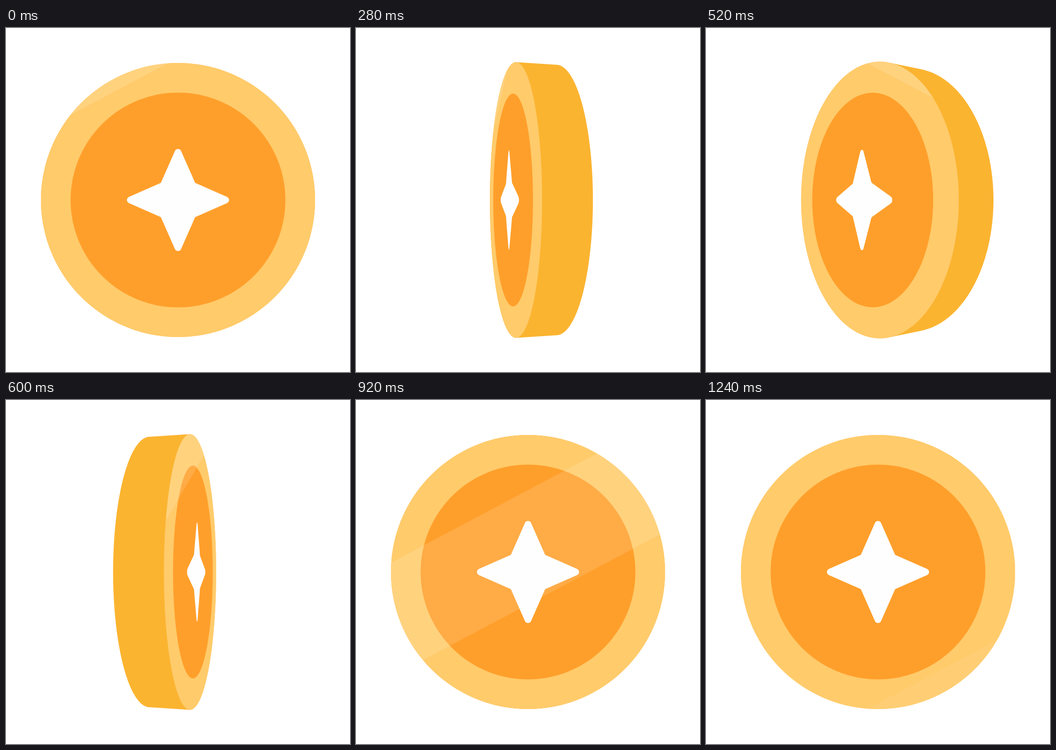
An HTML page with a canvas that plays this animation: 748 by 748 pixels, repeating every 1280 ms.

```html
<!DOCTYPE html>
<html>
<head>
<meta charset="utf-8">
<style>
  html, body { margin: 0; width: 100%; height: 100%; overflow: hidden; background: #fff; }
  canvas { display: block; width: 748px; height: 748px; }
</style>
</head>
<body>
<canvas id="stage" width="748" height="748"></canvas>
<script>
const ctx = document.getElementById('stage').getContext('2d');
const LOOP = 1280, STEP = 40, SPIN = 880;
const CENTER = 374, RADIUS = 298, INNER = 233.5;
const HALF = 44, CAMERA = 1080;          // half thickness, viewing distance
const SLOPE = 0.53, BAND = 248.5;        // glint tilt and height

const arc = (cx, cy, r, from, to, n) => Array.from({ length: n + 1 }, (_, i) => {
  const a = from + (to - from) * i / n;
  return [cx + r * Math.cos(a), cy + r * Math.sin(a)];
});
const circle = r => arc(0, 0, r, 0, 2 * Math.PI, 180);
const rim = circle(RADIUS), inner = circle(INNER);

// One rounded tip and one notch, turned four times
const arm = [...arc(0, -103.7, 7.3, -2.73, -0.41, 12), [37.3, -37.3]];
const star = [0, 1, 2, 3].flatMap(k => arm.map(([x, y]) =>
  [[x, y], [-y, x], [-x, -y], [y, -x]][k]));

// Cubic bezier ease (0.41, 0, 0.59, 1)
function easeInOut(x) {
  let lo = 0, hi = 1;
  for (let i = 0; i < 30; i++) {
    const s = (lo + hi) / 2, r = 1 - s;
    if (1.23 * r * r * s + 1.77 * r * s * s + s * s * s < x) lo = s; else hi = s;
  }
  return lo * lo * (3 - 2 * lo);
}

// Height of the glint's lower edge on the coin's vertical axis
function glintAt(t) {
  const late = Math.max(0, t - 920);
  return -309 + 0.958 * Math.max(0, t - 524) + 4.8e-6 * late ** 3;
}

function projector(angle, depth) {
  const c = Math.cos(angle), s = Math.sin(angle);
  return ([x, y]) => {
    const scale = (CAMERA - HALF) / (CAMERA - x * s - depth * c);
    return [CENTER + (x * c - depth * s) * scale, CENTER + y * scale];
  };
}

function hull(points) {
  const half = list => {
    const out = [];
    for (const p of list) {
      while (out.length > 1) {
        const [a, b] = out.slice(-2);
        if ((b[0] - a[0]) * (p[1] - a[1]) > (b[1] - a[1]) * (p[0] - a[0])) break;
        out.pop();
      }
      out.push(p);
    }
    return out;
  };
  const sorted = points.sort((a, b) => a[0] - b[0] || a[1] - b[1]);
  return [...half(sorted), ...half(sorted.slice().reverse())];
}

function trace(points) {
  ctx.beginPath();
  points.forEach(([x, y]) => ctx.lineTo(x, y));
  ctx.closePath();
}

function fill(points, color) {
  trace(points);
  ctx.fillStyle = color;
  ctx.fill();
}

function draw(t) {
  const turn = 2 * Math.PI * easeInOut(Math.min(1, t / SPIN));
  const flipped = Math.cos(turn) < 0;
  const angle = flipped ? turn - Math.PI : turn;
  const front = projector(angle, HALF), back = projector(angle, -HALF);

  ctx.fillStyle = '#fff';
  ctx.fillRect(0, 0, 748, 748);
  fill(hull([...rim.map(front), ...rim.map(back)]), '#fbb430');
  if (CAMERA * Math.cos(angle) <= HALF) return;

  fill(rim.map(front), '#ffcb6b');
  fill(inner.map(front), '#ff9f2b');

  const low = glintAt(t), lean = flipped ? -SLOPE : SLOPE, w = 400;
  const fade = Math.min(1, (1300 - t) / 120);
  ctx.save();
  trace(rim.map(front));
  ctx.clip();
  fill([[-w, low + lean * w], [w, low - lean * w],
        [w, low - BAND - lean * w], [-w, low - BAND + lean * w]].map(front),
       `rgba(255,255,255,${0.125 * fade})`);
  ctx.restore();

  fill(star.map(front), '#fefefe');
}

function tick() {
  draw(Math.floor(performance.now() % LOOP / STEP) * STEP);
  requestAnimationFrame(tick);
}
tick();
</script>
</body>
</html>
```
